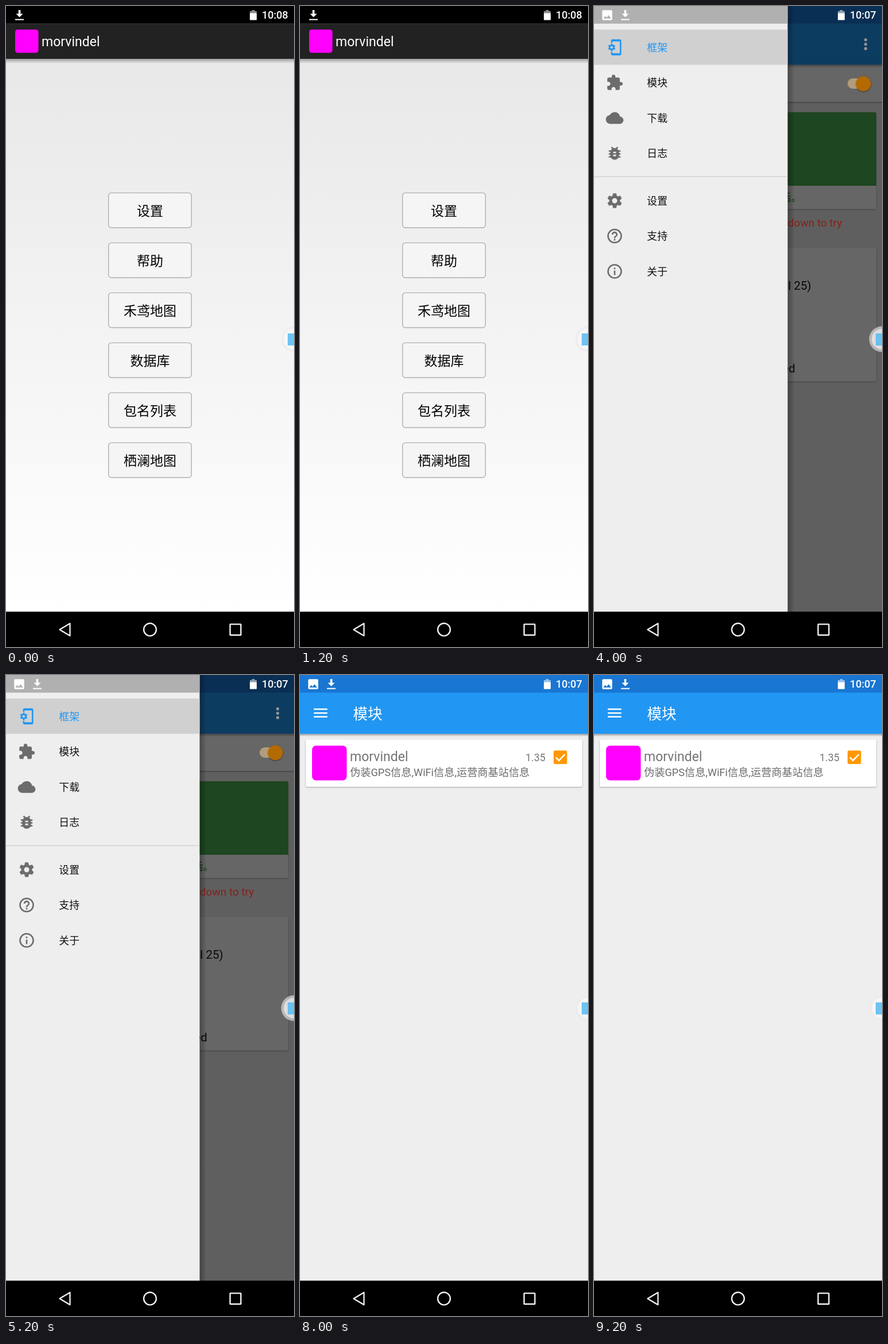
Recreate the animation shown at these times as an HTML page. Size 502 by 1116 pixels, loop 10 s.

```html
<!DOCTYPE html>
<html lang="zh-CN">
<head>
<meta charset="utf-8">
<title>Phone screens</title>
<style>
html, body { margin: 0; width: 100%; height: 100%; overflow: hidden; background: #000; }
svg { display: block; width: 100vw; height: 100vh; }
text { font-family: Roboto, "Noto Sans CJK SC", "Noto Sans CJK", sans-serif; white-space: pre; }
.scene { visibility: hidden; }
</style>
</head>
<body>
<svg id="stage" viewBox="0 0 502 1116" xmlns="http://www.w3.org/2000/svg"></svg>
<script>
const BLUE = '#2196f3', GREEN = '#4caf50', ORANGE = '#ff9800', GREY = '#757575', INK = '#111';
const APP = 'morvindel';

// Icon outlines on a 24 unit grid
const ICON = {
  phone: 'M16 1H8C6.34 1 5 2.34 5 4v16c0 1.66 1.34 3 3 3h8c1.66 0 3-1.34 3-3V4c0-1.66-1.34-3-3-3zm-2 20h-4v-1h4v1zm3.25-3H6.75V4h10.5v14z',
  shield: 'M12 1L3 5v6c0 5.55 3.84 10.74 9 12 5.16-1.26 9-6.45 9-12V5l-9-4zm-2 16l-4-4 1.41-1.41L10 14.17l6.59-6.59L18 9l-8 8z',
  puzzle: 'M20.5 11H19V7c0-1.1-.9-2-2-2h-4V3.5C13 2.12 11.88 1 10.5 1S8 2.12 8 3.5V5H4c-1.1 0-1.99.9-1.99 2v3.8H3.5c1.49 0 2.7 1.21 2.7 2.7s-1.21 2.7-2.7 2.7H2V20c0 1.1.9 2 2 2h3.8v-1.5c0-1.49 1.21-2.7 2.7-2.7s2.7 1.21 2.7 2.7V22H17c1.1 0 2-.9 2-2v-4h1.5c1.38 0 2.5-1.12 2.5-2.5S21.88 11 20.5 11z',
  cloud: 'M19.35 10.04C18.67 6.59 15.64 4 12 4 9.11 4 6.6 5.64 5.35 8.04 2.34 8.36 0 10.91 0 14c0 3.31 2.69 6 6 6h13c2.76 0 5-2.24 5-5 0-2.64-2.05-4.78-4.65-4.96z',
  picture: 'M21 19V5c0-1.1-.9-2-2-2H5c-1.1 0-2 .9-2 2v14c0 1.1.9 2 2 2h14c1.1 0 2-.9 2-2zM8.5 13.5l2.5 3.01L14.5 12l4.5 6H5l3.5-4.5z',
  frame: 'M19 1H9c-1.1 0-2 .9-2 2v3h2V4h10v16H9v-2H7v3c0 1.1.9 2 2 2h10c1.1 0 2-.9 2-2V3c0-1.1-.9-2-2-2z',
  query: 'M11 18h2v-2h-2zM12 6c-2.21 0-4 1.79-4 4h2c0-1.1.9-2 2-2s2 .9 2 2c0 2-3 1.75-3 5h2c0-2.25 3-2.5 3-5 0-2.21-1.79-4-4-4z',
  info: 'M11 17h2v-6h-2zM11 9h2V7h-2z',
};

const rect = (x, y, w, h, fill, more = '') =>
  `<rect x="${x}" y="${y}" width="${w}" height="${h}" fill="${fill}" ${more}/>`;
const disc = (x, y, r, fill, more = '') =>
  `<circle cx="${x}" cy="${y}" r="${r}" fill="${fill}" ${more}/>`;
const path = (d, fill, more = '') => `<path d="${d}" fill="${fill}" ${more}/>`;
const text = (s, x, y, size, fill, more = '') =>
  `<text x="${x}" y="${y}" font-size="${size}" fill="${fill}" ${more}>${s}</text>`;
const at = (x, y, scale, body) =>
  `<g transform="translate(${x} ${y}) scale(${scale}) translate(-12 -12)">${body}</g>`;
const line = (d, color, w, more = '') => path(d, 'none', `stroke="${color}" stroke-width="${w}" ${more}`);

function gear(x, y, scale, c) {
  let teeth = '';
  for (let a = 0; a < 360; a += 60)
    teeth += path('M-2-9.8H2L2.9-6H-2.9z', c,
      `transform="rotate(${a})" stroke="${c}" stroke-width=".4" stroke-linejoin="round"`);
  return `<g transform="translate(${x} ${y}) scale(${scale})">${teeth}` +
    disc(0, 0, 5.4, 'none', `stroke="${c}" stroke-width="3.8"`) + '</g>';
}

function bug(c) {
  return path('M6 11a6 6 0 0 1 12 0v4a6 6 0 0 1-12 0zM10 10v2h4v-2zM10 14v2h4v-2z', c, 'fill-rule="evenodd"') +
    line('M4 9H8M4 13H7M4 17H8M20 9H16M20 13H17M20 17H16M7.7 3.7L10.5 6.5M16.3 3.7L13.5 6.5', c, 2);
}

const ringed = (d, c) => disc(12, 12, 9, 'none', `stroke="${c}" stroke-width="2"`) + path(d, c);

function chip(x, y) {
  let s = rect(x - 8, y - 10.5, 16, 21, GREY, 'rx="1"');
  for (let i = 0; i < 4; i++) s += rect(x - 12.5, y - 9 + i * 5, 25, 2.6, GREY);
  for (let i = 0; i < 3; i++) s += rect(x - 1 + i * 3, y + 4, 1.4, 4, '#fff');
  return s;
}

const shade = (y, h = 5, o = 1) => rect(0, y, 502, h, 'url(#down)', `opacity="${o}"`);
const card = (y, h) => rect(10, y, 482, h, '#fff', 'rx="2.5" filter="url(#lift)"');

function download(x) {
  return path(`M${x - 1.8} 7h3.6v6.5h4.2l-6 6-6-6h4.2z`, '#fff') + rect(x - 7.5, 22.6, 15, 2, '#fff');
}

function status(time, pic) {
  return (pic ? at(23, 16, .97, path(ICON.picture, '#fff')) + download(54.5) : download(23.5)) +
    path('M428.5 7h5v2h3.5v4h-12v-4h3.5z', '#fff', 'opacity=".55"') +
    rect(425, 12.5, 12, 12, '#fff', 'rx=".8"') +
    text(time, 446, 22.3, 18, '#fff', 'font-weight="500"');
}

function nav() {
  const c = '#f2f2f2';
  return rect(0, 1054.5, 502, 61.5, '#000') +
    line('M93.5 1085.7L111.5 1075V1096.4Z', c, 2.3, 'stroke-linejoin="round"') +
    disc(251, 1085.7, 10.9, 'none', `stroke="${c}" stroke-width="2.4"`) +
    rect(390.6, 1076.4, 18.8, 18.8, 'none', `stroke="${c}" stroke-width="2.4" rx=".5"`);
}

const bubble = () => disc(502, 580, 22.5, '#ebebeb', 'opacity=".6"') +
  disc(502, 580, 18, '#fff', 'opacity=".55"') +
  rect(491, 570, 21, 21, '#5cbcf2', 'opacity=".88"');

function home() {
  const labels = ['设置', '帮助', '禾鸢地图', '数据库', '包名列表', '栖澜地图'];
  return rect(0, 0, 502, 1055, 'url(#page)') + rect(0, 0, 502, 31, '#000') +
    rect(0, 30.5, 502, 61.5, '#222') + rect(0, 30.5, 502, 1, '#383838') + shade(92, 8) +
    rect(16, 41, 40.5, 40.5, '#f0f', 'rx="4.5"') + text(APP, 62, 70, 23, '#fff') +
    labels.map((s, i) => {
      const y = 325.4 + i * 87;
      return rect(178.7, y, 144.6, 60.6, '#f5f5f5', 'rx="5" stroke="#b0b0b0" stroke-width="1.4"') +
        text(s, 251, y + 39.3, 23, '#000', 'text-anchor="middle"');
    }).join('') + status('10:08', false);
}

function bar(title) {
  return rect(0, 0, 502, 1055, '#eee') + rect(0, 0, 502, 31, '#1976d2') +
    rect(0, 30.7, 502, 71.8, BLUE) +
    line('M24 59.6H47.7M24 66.2H47.7M24 72.8H47.7', '#fff', 2.5) +
    text(title, 92.5, 76.8, 25.6, '#fff', 'font-weight="500"');
}

const dots = c => [58.8, 66.5, 74.2].map(y => disc(473.5, y, 2.6, c)).join('');
const toggle = () => rect(442, 126, 30, 18, '#ffdfb0', 'rx="9"') +
  disc(469.5, 135.2, 13, ORANGE, 'filter="url(#lift)"');
const warning = () => ['Could not load available ZIP files. Pull down to try', 'again.']
  .map((s, i) => text(s, 17, 384 + i * 22.3, 19, '#f44336')).join('');

function framework() {
  const rows = ['Android 7.1.2 (Nougat, API 25)', 'Torvim 3507429K', 'arm64', 'Verified Boot is deactivated'];
  return bar('Xposed Installer') + dots('#fff') +
    rect(0, 102.5, 502, 64.5, '#fff') + shade(102.5) + shade(167, 3) +
    text('Xposed Status', 15.5, 143, 20.45, '#000') + toggle() +
    card(185, 168.3) + path('M10 313V187.5a2.5 2.5 0 0 1 2.5-2.5H489.5a2.5 2.5 0 0 1 2.5 2.5V313z', GREEN) +
    disc(251, 249, 45, '#fff') +
    at(251, 249, 4.5, path('M10 17l-5-5 1.41-1.41L10 14.17l7.59-7.59L19 8z', GREEN)) +
    text('Xposed 框架 89 版已激活。', 251, 340.3, 18, GREEN, 'font-weight="700" text-anchor="middle"') +
    warning() + card(421, 232.5) +
    text('YOUR DEVICE', 18, 448.5, 18, GREY, 'font-weight="700"') +
    rows.map((s, i) => text(s, 102.5, 494 + i * 48, 20.45, INK)).join('') +
    rect(34, 474, 24, 24, GREY) + at(46, 533.5, 1.28, path(ICON.phone, GREY)) +
    chip(46, 581.5) + at(46, 629, 1.28, path(ICON.shield, GREY));
}

const check = () => rect(442, 131.5, 23.5, 23.5, ORANGE, 'rx="2.5"') +
  line('M446 143.5L451.4 149L461.6 138.2', '#fff', 2.6);

function modules() {
  return bar('模块') + shade(102.5) + card(112.5, 82) +
    rect(21, 123, 60.5, 60.5, '#f0f', 'rx="7"') + text(APP, 87, 150, 23, GREY) +
    text('1.35', 393, 150, 17.9, GREY) +
    text('伪装GPS信息,WiFi信息,运营商基站信息', 87, 176.3, 18.2, '#6c6c6c') + check();
}

const soft = (body, o) => `<g opacity="${o}">${body}</g>`;

// Open drawer over a dimmed page; bright parts of the page show through the scrim
function drawer(page, bright, chosen) {
  const items = [
    ['框架', 72, (y, c) => at(36, y, 1.28, path(ICON.frame, c) + gear(8, 12, .5, c))],
    ['模块', 133.5, (y, c) => at(36, y, 1.28, path(ICON.puzzle, c))],
    ['下载', 195, (y, c) => at(36, y, 1.28, path(ICON.cloud, c))],
    ['日志', 256.3, (y, c) => at(36, y, 1.28, bug(c))],
    ['设置', 339, (y, c) => gear(36, y, 1.28, c)],
    ['支持', 400.5, (y, c) => at(36, y, 1.28, ringed(ICON.query, c))],
    ['关于', 462, (y, c) => at(36, y, 1.28, ringed(ICON.info, c))],
  ];
  return page + rect(0, 0, 502, 1055, '#000', 'opacity=".6"') + bright +
    rect(337.5, 0, 12, 1055, 'url(#side)') +
    rect(0, 0, 337.5, 1055, '#eee') + rect(0, 0, 337.5, 30.7, '#b0b0b0') +
    rect(0, 41 + chosen * 61.4, 337.5, 61.4, '#d0d0d0') + rect(0, 296.5, 337.5, 1.3, '#d0d0d0') +
    items.map(([s, y, draw], i) =>
      draw(y, i === chosen ? BLUE : '#6c6c6c') +
      text(s, 92.3, y + 6.8, 17.9, i === chosen ? BLUE : INK, 'font-weight="500"')).join('') +
    status('10:07', true);
}

const fade = (id, dir, o) => `<linearGradient id="${id}" x1="0" y1="0" ${dir}>
  <stop offset="0" stop-color="#000" stop-opacity="${o}"/><stop offset="1" stop-color="#000" stop-opacity="0"/></linearGradient>`;
const defs = `<defs>
  <linearGradient id="page" gradientUnits="userSpaceOnUse" x1="0" y1="92" x2="0" y2="1055">
    <stop offset="0" stop-color="#e8e8e8"/><stop offset="1" stop-color="#fff"/></linearGradient>
  ${fade('down', 'x2="0" y2="1"', .32)}${fade('side', 'x2="1" y2="0"', .3)}
  <filter id="lift" x="-20%" y="-20%" width="140%" height="140%">
    <feDropShadow dx="0" dy="1" stdDeviation="1.1" flood-color="#000" flood-opacity=".38"/></filter></defs>`;

const scenes = [
  home(),
  framework() + status('10:07', true),
  drawer(framework(), soft(toggle(), .5) + soft(dots('#fff'), .3) + soft(warning(), .25), 0),
  drawer(modules(), soft(check(), .55), 1),
  modules() + status('10:07', true),
];

const stage = document.getElementById('stage');
stage.innerHTML = defs + scenes.map(s => `<g class="scene">${s}</g>`).join('') + bubble() + nav();

const HOLD = 2000, groups = [...stage.querySelectorAll('.scene')];
const start = performance.now();
function show(now) {
  const k = Math.floor(Math.max(0, now - start) / HOLD) % groups.length;
  groups.forEach((g, i) => { g.style.visibility = i === k ? 'visible' : 'hidden'; });
  requestAnimationFrame(show);
}
show(start);
</script>
</body>
</html>
```
